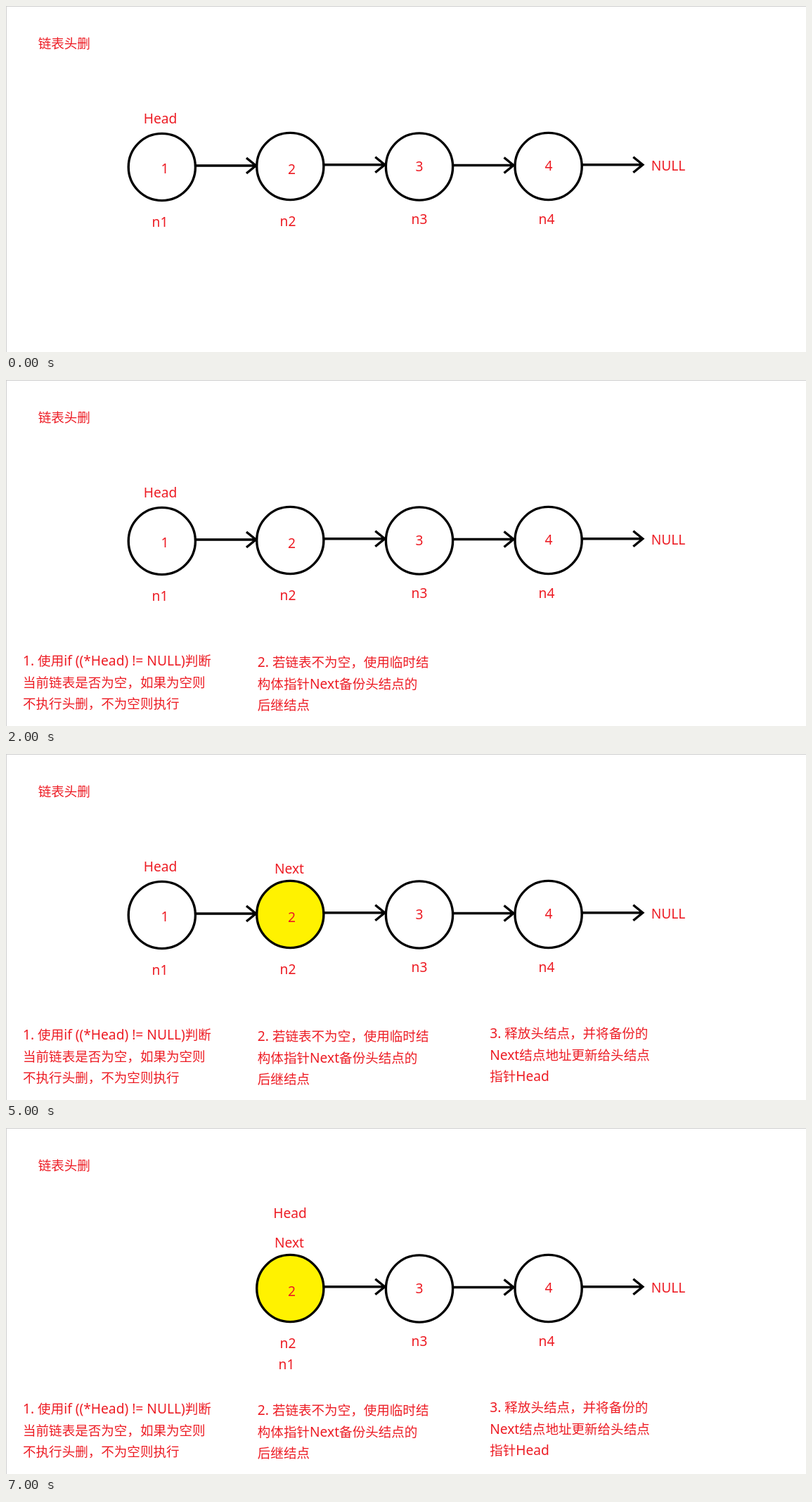
An HTML page that plays this animation: 1138x492 px, repeating every 8000 ms.

```html
<!DOCTYPE html>
<html lang="zh-CN">
<head>
<meta charset="utf-8">
<title>链表头删</title>
<style>
  html, body { margin: 0; width: 100%; height: 100%; overflow: hidden; background: #fff; }
  svg { display: block; width: 100%; height: 100%; }
  text { font: 19.2px "Noto Sans", "Open Sans", "Noto Sans CJK SC", sans-serif; fill: #ed1c24; }
  .zh { font: 18.56px "Noto Sans CJK SC", "Noto Sans CJK", sans-serif; }
  .mid text { text-anchor: middle; }
  .ink { fill: none; stroke: #000; stroke-width: 3.4; }
  .cross { fill: none; stroke: #ed1c24; stroke-width: 4; stroke-linecap: round; }

  .step { opacity: 0; animation: 8s step-end infinite; }
  .check { animation-name: check; }
  .backup { animation-name: backup; }
  .mark { animation-name: mark; }
  .next { animation-name: next; }
  .free { animation-name: free; }
  .strike { animation-name: strike; }
  .moved { animation-name: moved; }
  .old { animation: old 8s step-end infinite; }

  @keyframes check { 0% { opacity: 0 } 12.5%, 100% { opacity: 1 } }
  @keyframes backup { 0% { opacity: 0 } 25%, 100% { opacity: 1 } }
  @keyframes mark { 0% { opacity: 0 } 37.5%, 100% { opacity: 1 } }
  @keyframes next { 0% { opacity: 0 } 50%, 100% { opacity: 1 } }
  @keyframes free { 0% { opacity: 0 } 62.5%, 100% { opacity: 1 } }
  @keyframes strike { 0% { opacity: 0 } 75%, 100% { opacity: 1 } }
  @keyframes moved { 0% { opacity: 0 } 87.5%, 100% { opacity: 1 } }
  @keyframes old { 0% { opacity: 1 } 87.5%, 100% { opacity: 0 } }
</style>
</head>
<body>
<svg viewBox="0 0 1138 492">
  <defs>
    <circle id="ring" r="47.6"/>
    <path id="arrow" d="M-86.5 0H0M-14 -11L-.5 0L-14 11"/>
  </defs>

  <path d="M0 .5H1138M.5 0V492" stroke="#cfcfcf"/>
  <text class="zh" x="45.7" y="60">链表头删</text>

  <!-- head node, removed at the end -->
  <g class="old">
    <g class="ink">
      <use href="#ring" x="221.8" y="229"/>
      <use href="#arrow" x="356" y="227"/>
    </g>
    <text x="195.8" y="167">Head</text>
    <g class="mid">
      <text x="226" y="238">1</text>
      <text x="219" y="314">n1</text>
    </g>
    <path class="step strike cross" d="M189 194L254 266M254 194L189 266"/>
  </g>

  <!-- remaining nodes -->
  <circle class="step mark" cx="404.3" cy="228" r="47" fill="#fff200"/>
  <g class="ink">
    <use href="#ring" x="404.3" y="228"/>
    <use href="#ring" x="588" y="228.5"/>
    <use href="#ring" x="771.6" y="228"/>
    <use href="#arrow" x="539.3" y="225.8"/>
    <use href="#arrow" x="722.5" y="226.5"/>
    <use href="#arrow" x="906.3" y="225.8"/>
  </g>
  <g class="mid">
    <text x="406.5" y="239">2</text>
    <text x="588" y="235">3</text>
    <text x="772" y="234">4</text>
    <text x="401" y="313">n2</text>
    <text x="588" y="310">n3</text>
    <text x="769" y="310">n4</text>
  </g>
  <text x="917.7" y="234">NULL</text>

  <text class="step next" x="381.9" y="170">Next</text>
  <g class="step moved">
    <text x="380.2" y="128">Head</text>
    <text x="387.6" y="343">n1</text>
  </g>

  <!-- explanations -->
  <g class="step check">
    <text x="24" y="406">1. <tspan class="zh">使用</tspan>if ((*Head) != NULL)<tspan class="zh">判断</tspan></text>
    <text class="zh" x="24" y="436.5">当前链表是否为空，如果为空则</text>
    <text class="zh" x="24" y="467">不执行头删，不为空则执行</text>
  </g>
  <g class="step backup">
    <text x="357.8" y="408">2. <tspan class="zh">若链表不为空，使用临时结</tspan></text>
    <text x="357.8" y="438.5"><tspan class="zh">构体指针</tspan>Next<tspan class="zh">备份头结点的</tspan></text>
    <text class="zh" x="357.8" y="469">后继结点</text>
  </g>
  <g class="step free">
    <text x="688.2" y="404">3. <tspan class="zh">释放头结点，并将备份的</tspan></text>
    <text x="688.2" y="434.5">Next<tspan class="zh">结点地址更新给头结点</tspan></text>
    <text x="688.2" y="465"><tspan class="zh">指针</tspan>Head</text>
  </g>
</svg>
</body>
</html>
```
